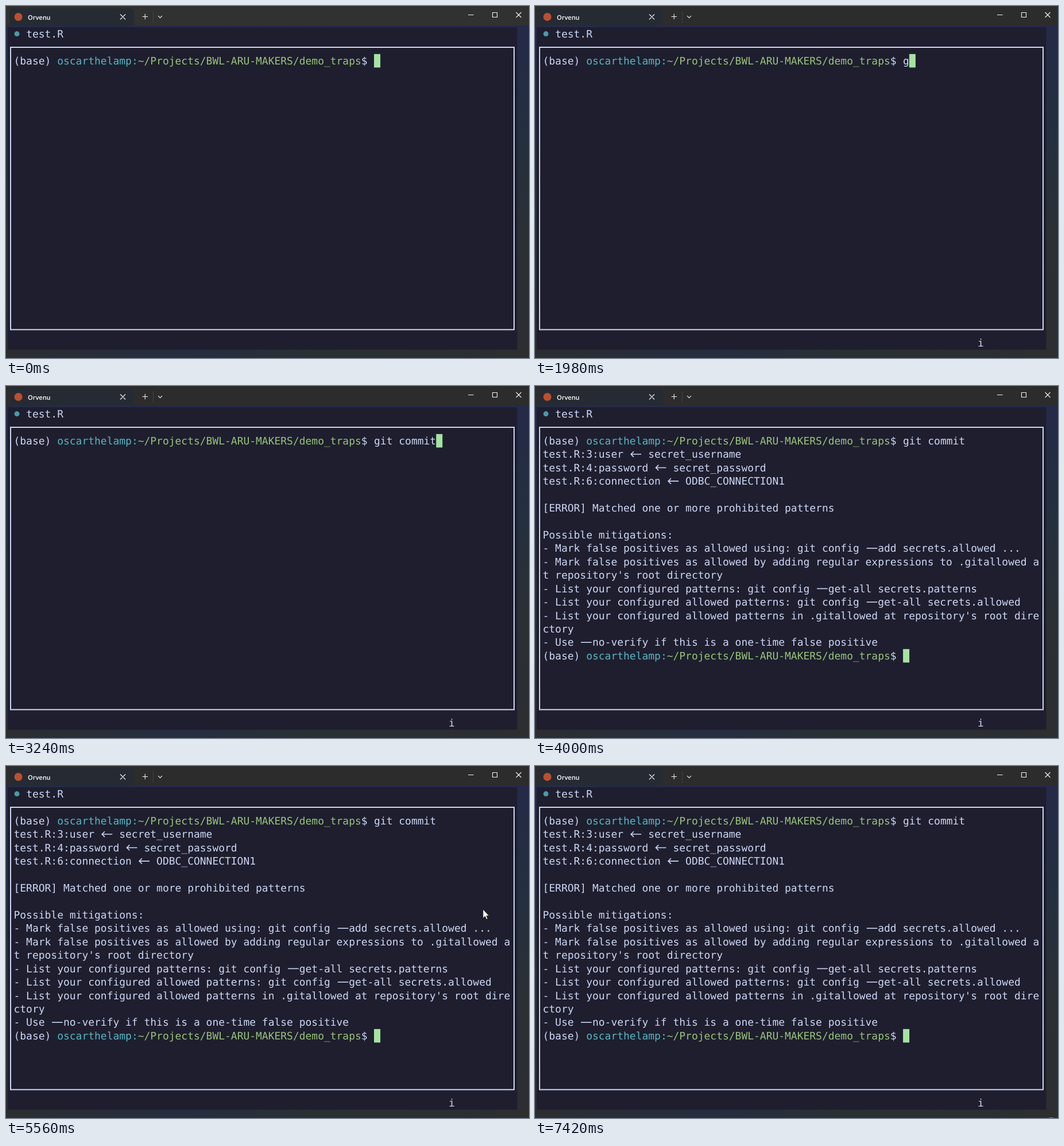
Animation of 911 by 614 pixels, one loop 7530 ms. Source, as an HTML page:

```html
<!DOCTYPE html>
<html lang="en">
<head>
<meta charset="utf-8">
<title>Terminal</title>
<style>
  html, body { margin: 0; width: 100%; height: 100%; overflow: hidden; background: #2c2c2c; }
  svg { display: block; width: 911px; height: 614px; }
  text { white-space: pre; text-rendering: geometricPrecision; }
  .term text { font: 17.97px "DejaVu Sans Mono", monospace; fill: #cdd6f4; }
  .term .user { fill: #56b6c2; }
  .term .path { fill: #98c379; }
  .line { fill: none; stroke: #cdd6f4; stroke-width: 1.6; }
  .icon { fill: none; stroke: #f2f2f2; stroke-width: 1.1; }
</style>
</head>
<body>
<svg viewBox="0 0 911 614">
  <defs>
    <linearGradient id="side" x2="0" y2="1">
      <stop offset="0" stop-color="#252a48"/>
      <stop offset=".3" stop-color="#232f40"/>
      <stop offset=".65" stop-color="#2b3033"/>
      <stop offset="1" stop-color="#2c2e30"/>
    </linearGradient>
    <linearGradient id="base">
      <stop offset="0" stop-color="#2b2d30"/>
      <stop offset=".35" stop-color="#252d40"/>
      <stop offset=".6" stop-color="#293033"/>
      <stop offset="1" stop-color="#2c2e30"/>
    </linearGradient>
  </defs>
  <rect y="34" width="911" height="580" fill="url(#side)"/>
  <rect y="599" width="911" height="15" fill="url(#base)"/>
  <rect id="bar" width="911" height="34" fill="#2c2c2c"/>
  <path d="M2 34q4 0 4-4V11q0-7 7-7H216q7 0 7 7V30q0 4 4 4Z" fill="#262b33"/>
  <circle cx="21.5" cy="19" r="7" fill="#bd4f2f"/>
  <text x="38" y="23.5" font-family="Open Sans, sans-serif" font-size="11" font-weight="600" fill="#fff">Orvenu</text>
  <path class="icon" d="M199 14.5l9 9m0-9l-9 9M237.5 18.5h9.5m-4.75-4.75v9.5M265 17.2l3.5 3.5 3.5-3.5M805 15.5h9.5M847.5 11.5h8v8h-8ZM888.5 11l9 9m0-9l-9 9"/>
  <path d="M256.5 9v20" stroke="#444"/>
  <rect x="3" y="37" width="887.5" height="562.5" fill="#1e1e2e"/>
  <rect class="line" x="8" y="72" width="877" height="492.5" style="stroke-width:2"/>
  <circle cx="19" cy="48.6" r="4.5" fill="#4a9aa8"/>
  <g class="term">
    <rect id="caret" width="11" height="23.5"/>
    <rect id="block" x="13.5" y="271.3" width="11" height="23.5" fill="#e4e4d0"/>
    <g id="fixed"></g>
    <g id="output"></g>
    <text id="typed"></text>
    <text id="mode">i</text>
  </g>
  <path id="mouse" d="M0 0V15.5L3.6 12.2 6 17.4 8.3 16.4 6 11.3H10.6Z" fill="#fff" stroke="#111" stroke-width=".8"/>
  <path id="edge" d="M895 613.5h8" stroke="#777"/>
</svg>
<script>
const LOOP = 7530, CELL = 10.82, ROW = 23.44;
const el = id => document.getElementById(id);
const colX = c => 13.5 + c * CELL;
const baseY = r => 101.8 + r * ROW;
const show = (id, on) => el(id).setAttribute('visibility', on ? 'visible' : 'hidden');
const place = (node, x, y) => { node.setAttribute('x', x); node.setAttribute('y', y); };
const clamp = v => Math.max(0, Math.min(1, v));

const prompt = '(base) <tspan class="user">oscarthelamp:</tspan>' +
  '<tspan class="path">~/Projects/BWL-ARU-MAKERS/demo_traps</tspan>$ ';
const report = `test.R:3:user <- secret_username
test.R:4:password <- secret_password
test.R:6:connection <- ODBC_CONNECTION1

[ERROR] Matched one or more prohibited patterns

Possible mitigations:
- Mark false positives as allowed using: git config --add secrets.allowed ...
- Mark false positives as allowed by adding regular expressions to .gitallowed a
t repository's root directory
- List your configured patterns: git config --get-all secrets.patterns
- List your configured allowed patterns: git config --get-all secrets.allowed
- List your configured allowed patterns in .gitallowed at repository's root dire
ctory
- Use --no-verify if this is a one-time false positive`.split('\n');

const textAt = (col, row, s) => `<text x="${colX(col)}" y="${baseY(row)}">${s}</text>`;

// Joins "<-" and "--" into single strokes, as a ligature font does.
function ligatureLine(s, row) {
  let strokes = '';
  const plain = s.replace(/<-|--/g, (pair, col) => {
    const x = colX(col), y = baseY(row) - 6.2;
    const head = pair === '<-' ? `M${x + 7} ${y - 4.8}l-4.8 4.8 4.8 4.8` : '';
    strokes += `<path class="line" d="M${x + 1.6} ${y}h18.6${head}"/>`;
    return '  ';
  });
  return textAt(0, row, plain) + strokes;
}

el('fixed').innerHTML = textAt(2, -2, 'test.R') + textAt(0, 0, prompt);
el('output').innerHTML = report.map((s, i) => ligatureLine(s, i + 1)).join('') + textAt(0, 16, prompt);
place(el('typed'), colX(58), baseY(0));
place(el('mode'), colX(70), baseY(21));

const command = 'git commit';
const keyTimes = [1980, 2090, 2270, 2390, 2620, 2690, 2750, 2930, 3110, 3240];

function mousePos(t) {
  if (t >= 60 && t < 1300) {
    const k = (1 - clamp((t - 60) / 380)) ** 2;
    return [748.5 + 30 * k, 277.5 + 266 * k];
  }
  if (t >= 5030 && t < 5560) {
    const p = (t - 5030) / 530, k = p * p * (3 - 2 * p);
    return [749 + 81.5 * k, 277.5 - 27.5 * k];
  }
  if (t >= 5560 && t < 5770) {
    const p = (t - 5560) / 210;
    return [830.5 + 80.5 * p, 250 + 200 * p * p];
  }
  return null;
}

function draw(t) {
  const normal = t >= 440 && t < 1300;
  const count = keyTimes.filter(k => t >= k).length;
  const done = t >= 4000, entered = t >= 3970;
  const row = done ? 16 : entered ? 1 : 0;
  const col = done ? 58 : entered ? 0 : 58 + count;

  el('typed').textContent = command.slice(0, count);
  place(el('caret'), colX(col), 83.8 + row * ROW);
  el('caret').setAttribute('fill', normal ? '#9399b2' : '#a6e3a1');
  show('block', normal);
  show('output', done);
  show('mode', t >= 1330);
  show('edge', t >= 7420);

  const shade = Math.round(49 - 5 * clamp((t - 60) / 200));
  el('bar').setAttribute('fill', `rgb(${shade},${shade},${shade})`);

  const pos = mousePos(t);
  show('mouse', pos);
  if (pos) el('mouse').setAttribute('transform', `translate(${pos})`);
}

const start = performance.now();
function tick() {
  draw((performance.now() - start) % LOOP);
  requestAnimationFrame(tick);
}
tick();
</script>
</body>
</html>
```
